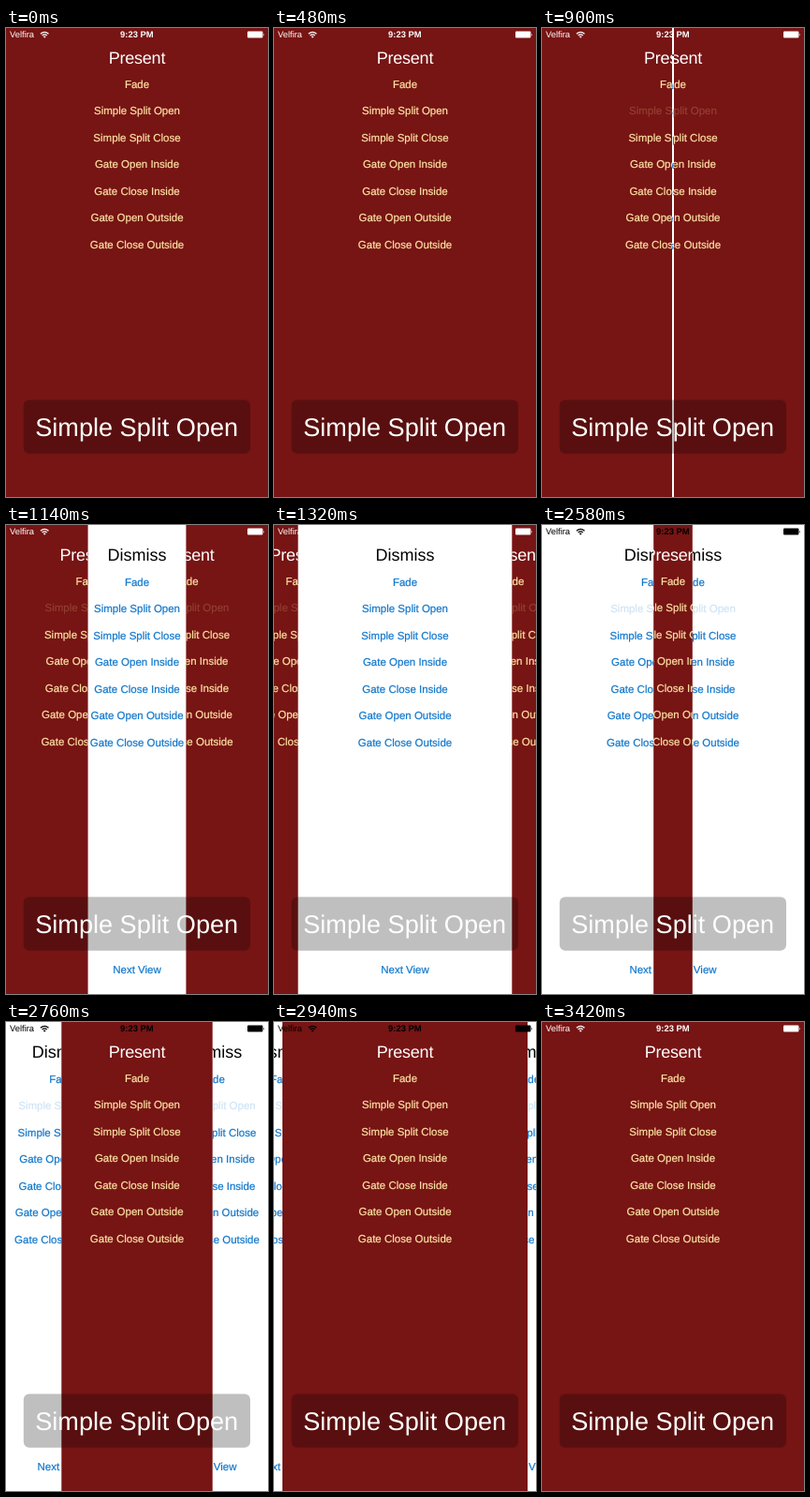
Recreate the animation shown at these times as an HTML page. Size 280 px wide and 500 px high, loop 3600 ms.

```html
<!DOCTYPE html>
<html lang="en">
<head>
<meta charset="utf-8">
<title>Split transition</title>
<style>
  html, body { margin: 0; width: 100%; height: 100%; overflow: hidden; }
  svg { display: block; width: 100vw; height: 100vh; }
  text {
    font-family: "Liberation Sans", Arial, sans-serif;
    text-anchor: middle;
    text-rendering: geometricPrecision;
  }
  .title { font-size: 18px; }
  .item { font-size: 11.5px; stroke-width: .2px; }
  .status { font-size: 9.4px; }
</style>
</head>
<body>
<svg viewBox="0 0 280 500">
  <defs>
    <clipPath id="clipL"><rect width="140" height="500"/></clipPath>
    <clipPath id="clipR"><rect x="140" width="140" height="500"/></clipPath>
    <g id="present"></g>
    <g id="dismiss"></g>
  </defs>

  <use id="back"/>
  <g id="left"><use clip-path="url(#clipL)"/></g>
  <g id="right"><use clip-path="url(#clipR)"/></g>

  <g id="bar" class="status" fill="currentColor">
    <text x="4" y="10.3" style="text-anchor:start">Velfira</text>
    <text x="139.8" y="10.3" font-weight="bold">9:23 PM</text>
    <g fill="none" stroke="currentColor" stroke-width="1.2">
      <path d="M36.9 6.3Q41.2 2.3 45.5 6.3"/>
      <path d="M38.6 8.1Q41.2 5.7 43.8 8.1"/>
    </g>
    <path d="M39.7 9.1Q41.2 7.9 42.7 9.1L41.2 10.8Z"/>
    <rect x="258" y="3.6" width="16.4" height="7" rx="1"/>
    <path d="M274.9 5.7q1.8 1.4 0 2.8z"/>
  </g>

  <rect x="18.8" y="396.6" width="242.2" height="57.2" rx="6" fill-opacity=".25"/>
  <text x="139.7" y="434.7" font-size="27.1" fill="#fff">Simple Split Open</text>
</svg>
<script>
const LOOP = 3600, STEP = 60, DURATION = 650, HALF = 140;
const ITEMS = ["Fade", "Simple Split Open", "Simple Split Close", "Gate Open Inside",
  "Gate Close Inside", "Gate Open Outside", "Gate Close Outside"];
const $ = id => document.getElementById(id);

function add(parent, tag, attrs, label = "") {
  const el = document.createElementNS("http://www.w3.org/2000/svg", tag);
  for (const key in attrs) el.setAttribute(key, attrs[key]);
  el.textContent = label;
  return parent.appendChild(el);
}

// Builds one screen and returns the menu entry that gets tapped.
function buildScreen(id, title, look) {
  const g = $(id);
  const item = (label, y) => add(g, "text",
    { class: "item", x: 140, y, fill: look.item, stroke: look.item }, label);
  add(g, "rect", { width: 280, height: 500, fill: look.bg });
  add(g, "text", { class: "title", x: 140, y: 38 + look.dy / 2, fill: look.title,
    "letter-spacing": look.spacing }, title);
  const rows = ITEMS.map((label, i) => item(label, 63.7 + look.dy + i * 28.5));
  if (look.footer) item(look.footer, 478);
  return rows[1];
}

const tapped = {
  present: buildScreen("present", "Present",
    { bg: "#771414", title: "#fff", item: "#fde5a5", dy: 0, spacing: -.25 }),
  dismiss: buildScreen("dismiss", "Dismiss",
    { bg: "#fff", title: "#000", item: "#1077cc", dy: .8, spacing: 0, footer: "Next View" })
};

const splits = [
  { from: "present", to: "dismiss", tap: 780, start: 863 },
  { from: "dismiss", to: "present", tap: 2340, start: 2406 }
];

// cubic-bezier(.42, 0, .58, 1)
function ease(x) {
  if (x <= 0) return 0;
  if (x >= 1) return 1;
  let lo = 0, hi = 1;
  for (let i = 0; i < 24; i++) {
    const s = (lo + hi) / 2, r = 1 - s;
    if (1.26 * r * r * s + 1.74 * r * s * s + s * s * s < x) lo = s;
    else hi = s;
  }
  return lo * lo * (3 - 2 * lo);
}

function draw(time) {
  const t = Math.floor(time % LOOP / STEP) * STEP;
  const split = splits[t < LOOP / 2 ? 0 : 1];
  const done = t >= split.start + DURATION;
  const shift = HALF * ease((t - split.start) / DURATION);

  $("back").setAttribute("href", "#" + split.to);
  for (const [id, sign] of [["left", -1], ["right", 1]]) {
    const half = $(id);
    half.firstChild.setAttribute("href", "#" + split.from);
    half.setAttribute("transform", `translate(${sign * shift})`);
    half.setAttribute("display", done ? "none" : "inline");
  }
  for (const s of splits) {
    const held = t >= s.tap && t < s.start + DURATION;
    tapped[s.from].setAttribute("opacity", held ? .2 : 1);
  }
  const shown = done ? split.to : split.from;
  $("bar").setAttribute("color", shown === "present" ? "#fff" : "#000");
}

const begin = performance.now();
function tick() {
  draw(performance.now() - begin);
  requestAnimationFrame(tick);
}
tick();
</script>
</body>
</html>
```
